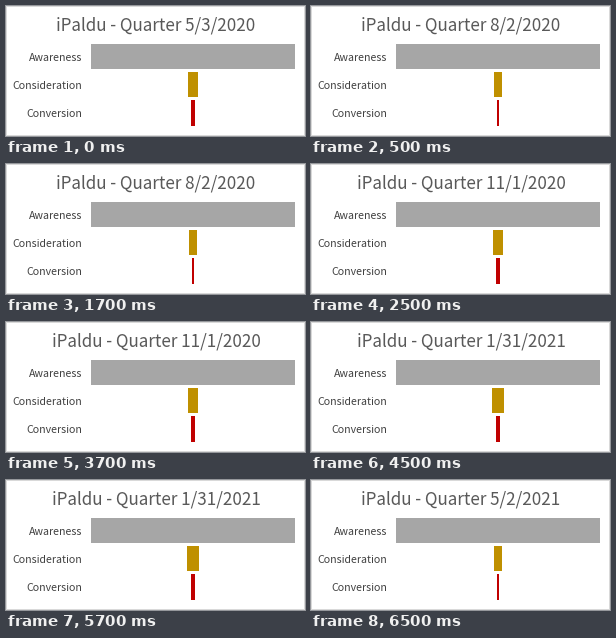
A matplotlib script for the animation above (8 s loop, 299x130 px).

```python
import matplotlib.pyplot as plt
from matplotlib.animation import FuncAnimation
from matplotlib.patches import Rectangle

W, H, DPI = 299, 130, 100
STEP_MS, LOOP_MS = 500, 8000
FONT = "Noto Sans CJK JP"
CENTER = 187

# start time (ms), quarter, consideration span, conversion span
QUARTERS = [
    (0, "5/3/2020", (182, 192), (185, 189)),
    (500, "8/2/2020", (183, 191), (186, 188)),
    (2500, "11/1/2020", (182, 192), (185, 189)),
    (4500, "1/31/2021", (181, 193), (185, 189)),
    (6500, "5/2/2021", (183, 191), (186, 188)),
]

fig = plt.figure(figsize=(W / DPI, H / DPI), dpi=DPI, facecolor="white")
ax = fig.add_axes([0, 0, 1, 1])
ax.set_xlim(0, W)
ax.set_ylim(H, 0)
ax.axis("off")


def box(x0, y0, x1, y1, color):
    return ax.add_patch(Rectangle((x0, y0), x1 - x0, y1 - y0,
                                  facecolor=color, linewidth=0,
                                  antialiased=False))


def label(x, baseline, text, px, color, align):
    return ax.text(x, baseline, text, fontsize=px * 72 / DPI, color=color,
                   family=FONT, ha=align, va="baseline")


def set_span(bar, span):
    bar.set_x(span[0])
    bar.set_width(span[1] - span[0])


# chart frame
box(0, 0, W, H, "#d9d9d9")
box(1, 1, W - 1, H - 1, "white")

box(85, 38, 289, 63, "#a6a6a6")
consideration = box(CENTER - 5, 66, CENTER + 5, 91, "#bf9000")
conversion = box(CENTER - 2, 94, CENTER + 2, 120, "#c00000")

for name, baseline in (("Awareness", 55), ("Consideration", 83),
                       ("Conversion", 111)):
    label(76.5, baseline, name, 10.6, "#404040", "right")
title = label(150, 25, "", 17, "#595959", "center")


def update(frame):
    now = frame * STEP_MS
    _, date, mid, low = [q for q in QUARTERS if q[0] <= now][-1]
    title.set_text(f"iPaldu - Quarter {date}")
    set_span(consideration, mid)
    set_span(conversion, low)
    return title, consideration, conversion


anim = FuncAnimation(fig, update, frames=LOOP_MS // STEP_MS,
                     interval=STEP_MS, repeat=True, repeat_delay=0)
plt.show()
```
